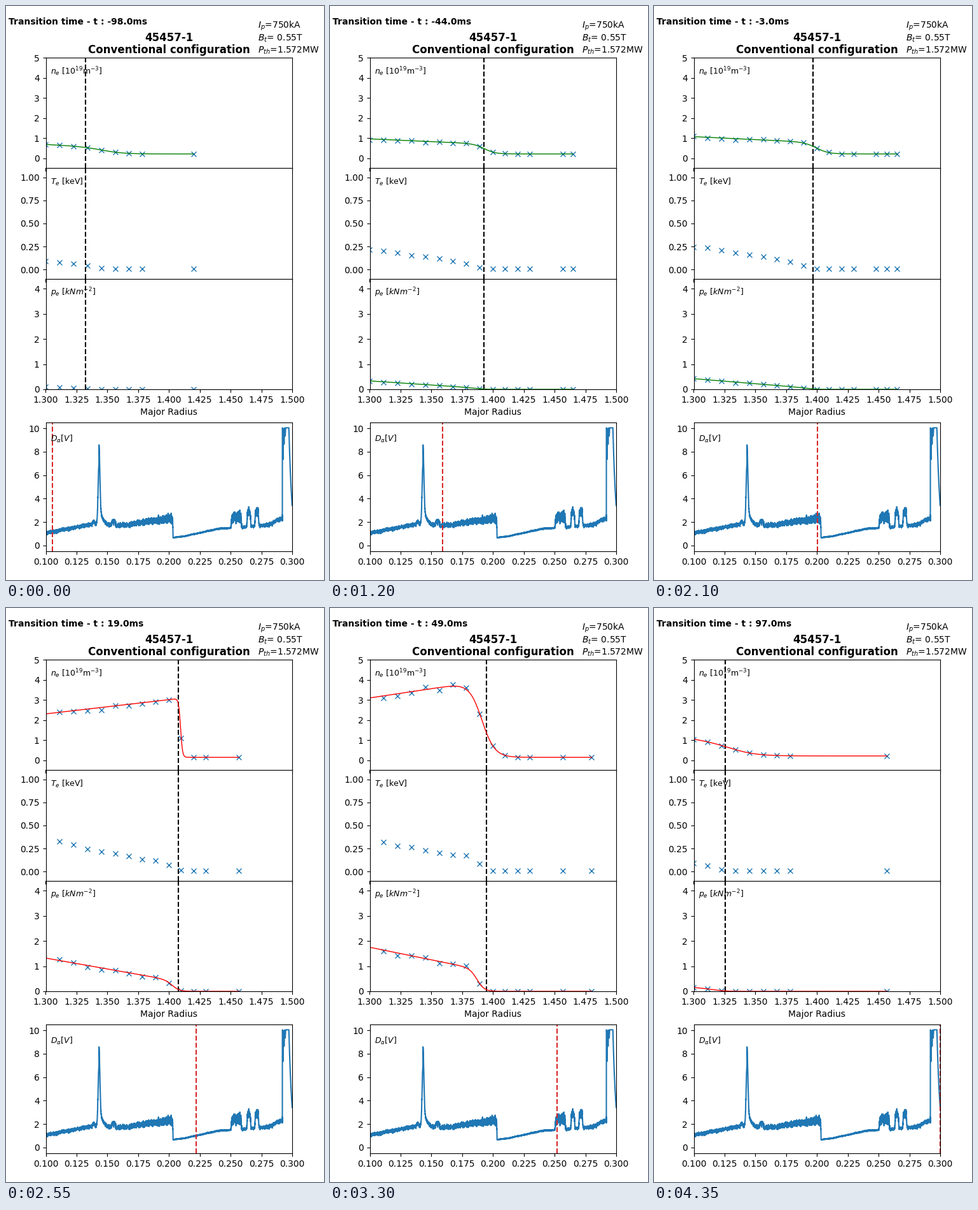
Animation, 500 px wide and 900 px high, one loop 4.5 s. Source, as a matplotlib script:

```python
import numpy as np
import matplotlib.pyplot as plt
from matplotlib.animation import FuncAnimation

W, H, DPI = 500, 900, 100
FRAMES, INTERVAL = 30, 150
LEFT, RIGHT = 62.5, 450
T_TRANS = 0.2032  # time of the transition in s
T_CRASH = 88      # end of the high-confinement phase, ms after it

# Frame number -> time relative to the transition (ms)
KEY_FRAMES = [0, 4, 11, 17, 20, 25, 29]
KEY_TIMES = [-98, -70, -25, 19, 36, 69, 97]

# Profile shape at each key time: density height, slope, centre, width;
# pressure height, slope, centre; plasma edge; outermost channel
SHAPES = np.array([
    (0.33, -3.0, 1.348, .018, 0.02, -1.7, 1.345, 1.3323, 11),
    (0.40, -2.4, 1.3844, .0074, 0.06, -2.2, 1.378, 1.3875, 17),
    (0.57, -2.9, 1.400, .010, 0.04, -4.0, 1.396, 1.3968, 16),
    (2.94, 7.1, 1.4094, .0016, 0.43, -8.65, 1.4032, 1.4076, 15),
    (3.86, 11, 1.4005, .010, 0.79, -9.0, 1.3955, 1.4014, 18),
    (3.70, 6.6, 1.3758, .011, 1.025, -11.4, 1.375, 1.3849, 15),
    (0.69, -6.0, 1.332, .023, 0.10, -3.0, 1.318, 1.3255, 15),
])

# Scattering channels crowd together outwards
K = np.arange(19)
R = 1.29975 + 0.011458 * K - 4.44e-6 * K**3


def pedestal(x, base, height, slope, x0, width):
    return base + (height + slope * (x - x0)) * 0.5 * (1 - np.tanh((x - x0) / width))


def window(t, start, end, ramp=0.0003):
    return 0.5 * (np.tanh((t - start) / ramp) - np.tanh((t - end) / ramp))


def dalpha():
    rng = np.random.default_rng(4)
    t = np.linspace(0.1, 0.3, 4000)
    v = np.interp(t, [.1, .139, .15, .165, .203, .2033, .212, .24, .26, .28, .2918],
                  [1.05, 1.85, 1.65, 1.75, 2.35, .67, .78, 1.42, 1.55, 1.75, 2.35])
    noise = np.interp(t, [.1, .15, .2, .203, .2033, .25, .26, .29],
                      [.07, .07, .18, .2, .015, .03, .05, .08])

    spike = t - 0.1432
    v += 5.2 * np.exp(-(spike / 0.001) ** 2)
    v += np.where(spike > 0, 1.6 * np.exp(-spike / 0.003), 0)
    for start, end, height, rough in [(.1378, .1398, .2, 0), (.1535, .1565, .35, 0),
                                      (.2506, .2588, .9, .22), (.2634, .2662, 1.25, .15),
                                      (.2699, .2727, 1.25, .15)]:
        box = window(t, start, end)
        v += height * box
        noise += rough * box
    v += noise * rng.standard_normal(t.size)

    # Final burst saturates the detector, then decays
    burst = np.where(t > 0.292, 10.05 * np.exp(-np.maximum(t - 0.2973, 0) / 0.0025), 0)
    for centre, depth in [(.2926, 2.7), (.2934, 1.4), (.2943, .7)]:
        burst -= depth * np.exp(-((t - centre) / 0.0002) ** 2)
    return t, np.minimum(np.maximum(v, burst), 10.05)


fig = plt.figure(figsize=(W / DPI, H / DPI), dpi=DPI, facecolor="white")


def make_axes(top, bottom, xlim, ylim, yticks, label):
    ax = fig.add_axes([LEFT / W, 1 - bottom / H, (RIGHT - LEFT) / W, (bottom - top) / H])
    ax.set_xticks(np.linspace(*xlim, 9))
    ax.set_yticks(yticks)
    ax.set_xlim(*xlim)
    ax.set_ylim(*ylim)
    ax.text(0.02, 0.85, label, transform=ax.transAxes, fontsize=9)
    return ax


def fig_text(x, y, s, **kw):
    return fig.text(x / W, 1 - y / H, s, fontsize=10, **kw)


TOP, STEP = 81, 520 / 3
RADII = (1.3, 1.5)
ax_n = make_axes(TOP, TOP + STEP, RADII, (-0.5, 5), range(6), r"$n_e$ [$10^{19}$m$^{-3}$]")
ax_t = make_axes(TOP + STEP, TOP + 2 * STEP, RADII, (-0.1, 1.1),
                 np.arange(0, 1.1, 0.25), "$T_e$ [keV]")
ax_p = make_axes(TOP + 2 * STEP, TOP + 3 * STEP, RADII, (0, 4.4), range(5),
                 r"$p_e$ [$kNm^{-2}$]")
ax_d = make_axes(653.1, 855, (0.1, 0.3), (-0.5, 10.5), range(0, 11, 2), r"$D_{\alpha}[V]$")

for ax in (ax_n, ax_t):
    ax.tick_params(labelbottom=False)
ax_n.set_title("45457-1\nConventional configuration", fontsize=12, fontweight="bold",
               pad=5, linespacing=1.08)
ax_p.set_xlabel("Major Radius")

clock = fig_text(4, 29, "", fontweight="bold")
for y, s in [(35, "$I_p$=750kA"), (55, "$B_t$= 0.55T"), (74, "$P_{th}$=1.572MW")]:
    fig_text(396, y, s)

profiles = (ax_n, ax_t, ax_p)
points = [ax.plot([], [], "x", color="C0")[0] for ax in profiles]
edges = [ax.axvline(1.35, color="k", ls="--", lw=1.5) for ax in profiles]
fit_n, fit_p = (ax.plot([], [], lw=1)[0] for ax in (ax_n, ax_p))

ax_d.plot(*dalpha(), color="C0", lw=1.5)
cursor = ax_d.axvline(0.1, color="C3", ls="--", lw=1.5)


def shape_at(t):
    # Steady before the transition, a jump at it, steady again until the crash
    u = np.interp(t, [-98, -70, -25, 0, 0.1, 19, 36, 69, 84, 97],
                  [0, 1, 2, 2, 2.4, 3, 4, 5, 5, 6])
    row = [np.interp(u, range(len(SHAPES)), col) for col in SHAPES.T]
    return row[:4], row[4:7], row[7], int(SHAPES[int(round(u)), 8])


def update(i):
    t = float(np.round(np.interp(i, KEY_FRAMES, KEY_TIMES)))
    clock.set_text(f"Transition time - t : {t:.1f}ms")
    cursor.set_xdata([T_TRANS + t / 1000] * 2)

    high = 0 < t < T_CRASH
    ne_shape, pe_shape, edge, last = shape_at(t)

    def density(x):
        return pedestal(x, 0.14 if high else 0.21, *ne_shape)

    def pressure(x):
        return pedestal(x, 0, *pe_shape, 0.006 if high else 0.010)

    seen = (R < edge + 0.053) | (K == last) | ((K == 15) & (t > -50))
    seen &= (K <= last) & (K != 13)
    if high:
        seen &= (K != 0) & (K != 14)
    r = R[seen]

    rng = np.random.default_rng(i)
    jitter = rng.normal(1, 0.025, (2, K.size))[:, seen]
    ne = density(r) * jitter[0]
    te = np.maximum(pressure(r) / (1.6 * density(r)) * jitter[1], 0.01)
    for line, y in zip(points, (ne, te, 1.6 * ne * te)):
        line.set_data(r, y)

    x = np.linspace(1.295, r[-1], 600)
    for line, fit in ((fit_n, density), (fit_p, pressure)):
        line.set_data(x, fit(x))
        line.set_color("g" if t < 0 else "r")
    fit_p.set_visible(pressure(1.3) > 0.12)  # too weak to fit at first

    for line in edges:
        line.set_xdata([edge, edge])
    return [clock, cursor, fit_n, fit_p, *points, *edges]


anim = FuncAnimation(fig, update, frames=FRAMES, interval=INTERVAL,
                     repeat=True, repeat_delay=0, blit=False)
plt.show()
```
